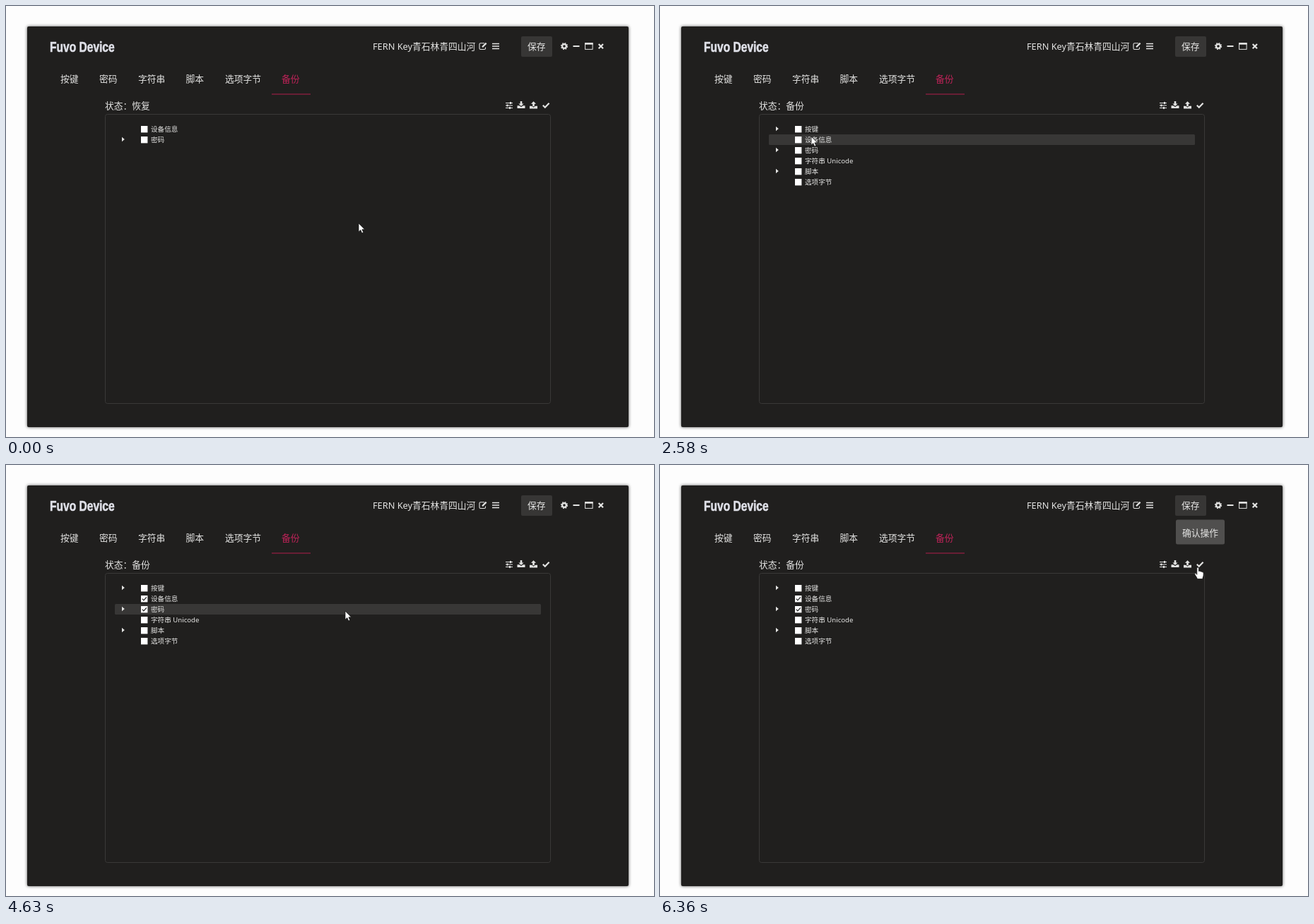
An HTML page that plays this animation: 917 by 611 pixels, repeating every 6540 ms.

```html
<!DOCTYPE html>
<html lang="zh-CN">
<head>
<meta charset="utf-8">
<title>备份</title>
<style>
  html, body { margin: 0; width: 100%; height: 100%; overflow: hidden; background: #fdfdfd; }
  svg { display: block; width: 100vw; height: 100vh; }
  text { font: 12.75px "Noto Sans", "Noto Sans CJK SC", "Noto Sans CJK", sans-serif; fill: #e4e4e3; white-space: pre; }
  .title { font: bold 20.5px "Liberation Sans", sans-serif; fill: #dfe0e8; stroke: #dfe0e8; stroke-width: .6; }
  .row text { font-size: 9.6px; }
  .window { fill: #201f1e; filter: drop-shadow(0 0 2px #000a); }
  .line { fill: none; stroke: #e4e4e3; }
  .solid { fill: #e4e4e3; }
  #tip text { text-anchor: middle; }
</style>
</head>
<body>
<svg viewBox="0 0 917 611">
  <defs>
    <path id="tray" d="M0 6.3H3L5.5 8.3 8 6.3H11V10H0Z"/>
  </defs>
  <rect class="window" x="30" y="29" width="851" height="568" rx="2"/>
  <text class="title" transform="translate(62 65) scale(.76 1)">Fuvo Device</text>
  <text x="519" y="62">FERN Key青石林青四山河</text>
  <rect x="729" y="43" width="44" height="29" rx="2" fill="#373635"/>
  <text x="738" y="62">保存</text>
  <g id="tabs"></g>
  <path d="M376 125H431" stroke="#b01f4c"/>
  <text id="status" x="140" y="146"></text>
  <rect x="140.5" y="153.5" width="630" height="410" rx="3" fill="none" stroke="#3a3938"/>

  <!-- title bar icons -->
  <g class="line">
    <path d="M677 52.7H671.5Q670 52.7 670 54.2V60Q670 61.5 671.5 61.5H677Q678.5 61.5 678.5 60V58.5" stroke-width="1.1"/>
    <path d="M674 58.2 679.6 52.6" stroke-width="2.2"/>
    <path d="M688 53.5H698M688 57H698M688 60.5H698" stroke-width="1.6"/>
    <circle cx="790" cy="57" r="2.9" stroke-width="2.2"/>
    <circle cx="790" cy="57" r="4.5" stroke-width="1.3" stroke-dasharray="1.77"/>
    <path d="M802.5 57H811.5" stroke-width="2"/>
    <rect x="819.6" y="52.6" width="10.5" height="8.8"/>
    <path d="M819 53.5H830.6" stroke-width="2.4"/>
    <path d="M838.7 54 845 60.3M845 54 838.7 60.3" stroke-width="2.2"/>
  </g>

  <!-- toolbar icons -->
  <g class="line">
    <path d="M707 137.5H717M707 141H717M707 144.5H717" stroke-width="1.1"/>
    <path d="M714 136V139M709.5 139.5V142.5M713 143V146" stroke-width="2"/>
    <path d="M759.8 140.7 762.8 143.7 768.6 137.8" stroke-width="2.2"/>
  </g>
  <g class="solid">
    <use href="#tray" x="723.5" y="135"/>
    <path d="M727.7 135H730.3V138.5H732.6L729 142 725.4 138.5H727.7Z"/>
    <use href="#tray" x="741" y="135.5"/>
    <path d="M745.2 142.2H747.8V138.7H750.1L746.5 135.2 742.9 138.7H745.2Z"/>
  </g>

  <rect id="hover" x="154" width="603" height="15" rx="1.5" fill="#383736"/>
  <g id="rows"></g>
  <g id="tip">
    <rect y="77.5" height="35" rx="2.5" fill="#504f4e"/>
    <text y="100.5"></text>
  </g>
  <g id="cursor" fill="#fff" stroke="#111" stroke-width=".7">
    <path id="arrow" d="M0 0V12.2L2.8 9.6 4.7 14 6.8 13.1 4.9 8.8H8.6Z"/>
    <path id="hand" d="M-1.2 1.3a1.3 1.3 0 0 1 2.6 0V5.6c1-.5 2-.3 2.4.5 1-.4 1.9-.1 2.3.7 1-.2 2 .3 2 1.5V11c0 2-1.2 3-1.2 5.5H-.6C-1 14-4 11.5-4.3 9.6c-.2-1 1.4-1.4 2-.6l1.1 1.3Z"/>
  </g>
</svg>
<script>
const LOOP = 6540, STEP = 172, LAST_STEP = 37;
const SWITCH_STEP = 10; // backup mode is chosen
const $ = id => document.getElementById(id);
const show = (el, on) => el.setAttribute('visibility', on ? 'visible' : 'hidden');

// Pointer path: [step, x, y]
const path = [
  [0, 499, 308], [1, 499, 308], [2, 515, 300], [3, 580, 255], [4, 650, 203], [5, 705, 163],
  [6, 726, 145], [7, 727, 144], [12, 727, 144], [13, 586, 150], [14, 370, 172],
  [15, 214, 185], [17, 197, 189], [19, 197, 189], [20, 197, 199], [21, 198, 208],
  [24, 198, 208], [25, 204, 208], [26, 330, 215], [27, 480, 207], [28, 618, 190],
  [29, 710, 165], [30, 757, 147], [31, 760, 146], [32, 774, 139], [33, 778, 136],
  [34, 764, 143], [35, 745, 147], [36, 750, 147], [37, 761, 145]
];

const tools = [
  { x: 729.5, label: '备份到文件' },
  { x: 747, label: '从文件恢复' },
  { x: 764.5, label: '确认操作' }
];

const info = { label: '设备信息', checkedAt: 18 };
const codes = { label: '密码', branch: true, checkedAt: 23 };
const restoreRows = [info, codes];
const backupRows = [
  { label: '按键', branch: true }, info, codes,
  { label: '字符串 Unicode' }, { label: '脚本', branch: true }, { label: '选项字节' }
];

const tabs = [['按键', 77], ['密码', 132], ['字符串', 187], ['脚本', 254.5], ['选项字节', 310], ['备份', 390]];
$('tabs').innerHTML = tabs.map(([label, x]) =>
  `<text x="${x}" y="107.5"${label === '备份' ? ' style="fill:#c2235a"' : ''}>${label}</text>`).join('');

function pointerAt(step) {
  const i = Math.max(1, path.findIndex(p => p[0] >= step));
  const [s0, x0, y0] = path[i - 1], [s1, x1, y1] = path[i];
  const f = (step - s0) / (s1 - s0);
  return [x0 + (x1 - x0) * f, y0 + (y1 - y0) * f];
}

function rowMarkup({ label, branch, checkedAt }, index, step) {
  return `<g class="row" transform="translate(0 ${167 + index * 15})">
    ${branch ? '<path class="solid" d="M164 3.7 167.8 7 164 10.3Z"/>' : ''}
    <rect x="191" y="3" width="9.4" height="9.4" fill="#fff"/>
    ${step >= checkedAt ? '<path d="M192.8 7.6 194.9 9.8 198.8 5.4" fill="none" stroke="#222" stroke-width="1.2"/>' : ''}
    <text x="205" y="11.2">${label}</text></g>`;
}

function draw(step) {
  const [x, y] = pointerAt(step);
  const backup = step >= SWITCH_STEP;
  const rows = backup ? backupRows : restoreRows;
  $('status').textContent = '状态：' + (backup ? '备份' : '恢复');
  $('rows').innerHTML = rows.map((row, i) => rowMarkup(row, i, step)).join('');

  const over = Math.floor((y - 167) / 15);
  show($('hover'), x > 154 && x < 757 && over >= 0 && over < rows.length);
  $('hover').setAttribute('y', 167 + over * 15);

  const tool = y > 134 && y < 149 && tools.find(t => Math.abs(x - t.x) < 8);
  show($('tip'), tool);
  show($('hand'), tool);
  show($('arrow'), !tool);
  if (tool) {
    const [box, text] = $('tip').children;
    const width = tool.label.length * 12.75 + 18;
    box.setAttribute('x', tool.x - width / 2);
    box.setAttribute('width', width);
    text.setAttribute('x', tool.x);
    text.textContent = tool.label;
  }
  $('cursor').setAttribute('transform', `translate(${x} ${y})`);
}

let shown = -1;
function tick() {
  const time = performance.now() % LOOP;
  const step = Math.min(LAST_STEP, Math.floor((time + 17) / STEP));
  if (step !== shown) draw(shown = step);
  requestAnimationFrame(tick);
}
tick();
</script>
</body>
</html>
```
